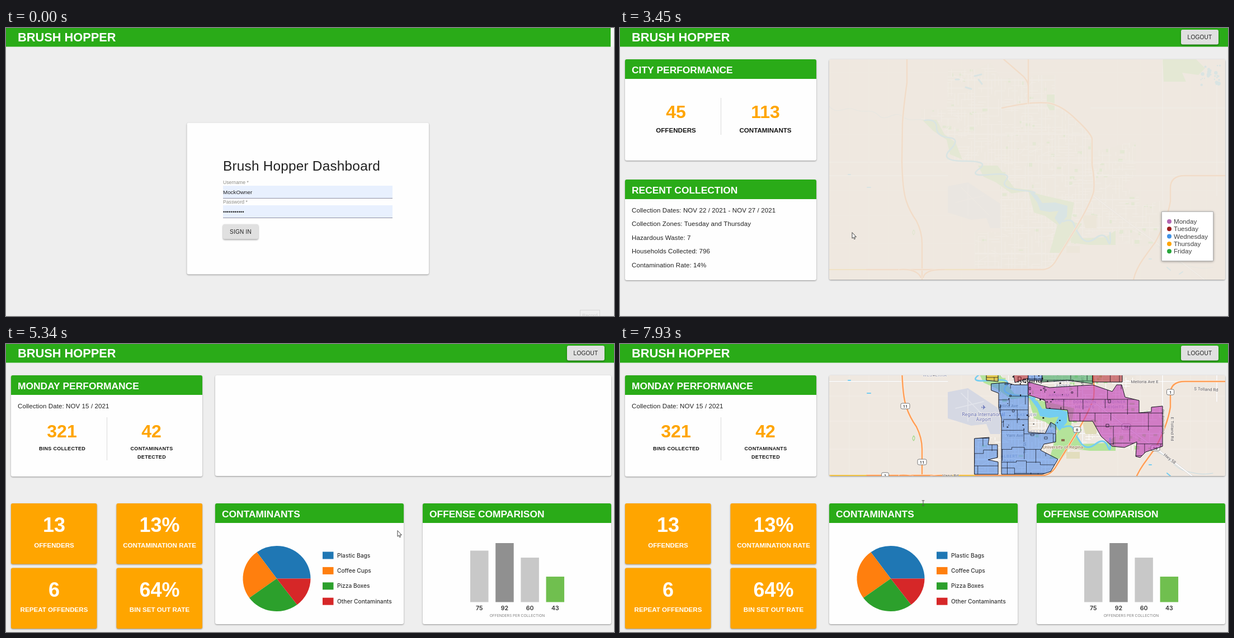
An HTML page with a canvas that plays this animation: 1087 by 515 pixels, repeating every 8 s.

```html
<!DOCTYPE html>
<html lang="en">
<head>
<meta charset="utf-8">
<title>Waste dashboard</title>
<style>
html, body { margin: 0; width: 100%; height: 100%; overflow: hidden; background: #eee; }
canvas { display: block; }
</style>
</head>
<body>
<canvas id="stage" width="1087" height="515"></canvas>
<script>
const W = 1087, H = 515, LOOP = 8000;
const GREEN = '#2aab18', ORANGE = '#ffa500', LAND = '#efe8e0';
const SANS = '"Liberation Sans", Arial, sans-serif';
const MAPFONT = 'Roboto, sans-serif';
const CHART = 'Inter, sans-serif';
const BRAND = 'Brush Hopper';
const stage = document.getElementById('stage').getContext('2d');
let g = stage;

// ---------- helpers ----------
let seed = 7;
const rnd = (a = 0, b = 1) => {
  seed = (seed * 16807) % 2147483647;
  return a + (b - a) * seed / 2147483647;
};
const ramp = (t, a, b) => Math.min(1, Math.max(0, (t - a) / (b - a)));

function text(s, x, y, size, { color = '#212121', weight = 400, font = SANS, align = 'left', gap = 0 } = {}) {
  g.font = `${weight} ${size}px ${font}`;
  g.letterSpacing = gap + 'px';
  g.textAlign = align;
  g.fillStyle = color;
  g.fillText(s, x, y);
}
const bold = (s, x, y, size, color, align = 'center', gap = 0) =>
  text(s, x, y, size, { color, weight: 700, align, gap });

function rect(x, y, w, h, color) {
  g.fillStyle = color;
  g.fillRect(x, y, w, h);
}
function box(x, y, w, h, r, color, blur = 2.5, dy = 1) {
  g.save();
  g.shadowColor = 'rgba(0,0,0,.4)';
  g.shadowBlur = blur;
  g.shadowOffsetY = dy;
  g.beginPath();
  g.roundRect(x, y, w, h, r);
  g.fillStyle = color;
  g.fill();
  g.restore();
}
function disc(x, y, r, color) {
  g.beginPath();
  g.arc(x, y, r, 0, 7);
  g.fillStyle = color;
  g.fill();
}
function line(d, color, width) {
  g.strokeStyle = color;
  g.lineWidth = width;
  g.lineJoin = g.lineCap = 'round';
  g.stroke(new Path2D(d));
}
function area(d, color) {
  g.fillStyle = color;
  g.fill(new Path2D(d));
}
function within(d, draw) {
  g.save();
  g.clip(new Path2D(d));
  draw();
  g.restore();
}
function layer(draw) {
  const c = document.createElement('canvas');
  c.width = W;
  c.height = H;
  g = c.getContext('2d');
  draw();
  g = stage;
  return c;
}

// ---------- map: ground, water, roads ----------
const PARK = '#b4e39a', WATER = '#74cdf1', ROAD = '#ff9f58';
const URBAN = 'M586 74H634L662 62L682 90H728L740 84H778V134L815 166L842 195V222L922 202V262L900 284' +
  'L928 298V320L970 308V390H922L850 362L790 402L768 430H634V364H680V262L630 242L584 238V184L538 166V145H584Z';

function townStreets() {
  within(URBAN, () => {
    area(URBAN, '#ede6dd');
    for (let i = 0; i < 150; i++) rect(rnd(540, 970), rnd(62, 430), rnd(2, 9), rnd(2, 7), PARK);
    for (let i = 0; i < 1500; i++) {
      const x = 538 + Math.round(rnd(0, 72)) * 6, y = 62 + Math.round(rnd(0, 74)) * 5;
      const n = rnd(6, 30), wide = rnd() < .5;
      rect(x, y, wide ? n : 1, wide ? 1 : n, '#fff');
    }
    for (let i = 0; i < 60; i++) {
      const x = rnd(540, 960), y = rnd(70, 420);
      line(`M${x} ${y}q${rnd(0, 12)} ${rnd(-8, 8)} ${rnd(8, 20)} ${rnd(-12, 12)}`, '#fff', 1);
    }
    for (const x of [634, 658, 682, 706, 730, 754, 778, 802, 827])
      line(`M${x} 56V450`, '#d9d6d6', 2.2), line(`M${x} 56V450`, '#fff', 1.4);
    for (const y of [93, 143, 190, 240, 264, 307, 357, 404])
      line(`M538 ${y}H970`, '#d9d6d6', 2.2), line(`M538 ${y}H970`, '#fff', 1.4);
  });
}

const ground = layer(() => {
  rect(374, 56, 708, 395, LAND);
  for (const x of [410, 445, 480, 560, 610, 890, 930, 1020, 1048]) line(`M${x} 56V450`, '#f3eee8', .8);
  for (const y of [80, 190, 290, 335, 385]) line(`M374 ${y}H1082`, '#f3eee8', .8);
  line('M374 240H682M374 264H586M842 143H1082M845 264H1000M970 56V330M850 240H1082M1067 100V300', '#e0dcd8', 2.4);
  line('M374 240H682M374 264H586M842 143H1082M845 264H1000M970 56V330M850 240H1082M1067 100V300', '#fff', 1.6);
  area('M586 283L622 276L681 315V358H662L655 340L628 343L586 330Z', '#d5d8e3');
  line('M610 285L660 335M600 312L650 300M622 280V335', '#e3e5ec', 1.5);
  townStreets();
  area('M970 56H1030L1046 72L1034 84L1005 80L1012 96H972Z', PARK);
  area('M763 119H777V147H768L763 138Z', PARK);
  area('M540 164H566L580 190L600 205L612 235L590 226L584 200L560 184Z', PARK);
  area('M640 246H675L705 286L740 290L700 296L672 276L650 266Z', PARK);
  area('M730 292L760 300L812 312L806 346L826 350L790 402H768L782 352L760 336L740 330Z', PARK);
  area('M808 352L824 376L868 374L886 362V388H840L806 384Z', PARK);
  area('M826 335H852V358H832Z', '#dfdcb8');
  area('M798 390H822V402H798Z', '#e2ddbd');
  line('M374 140C390 158 402 138 420 146S448 142 462 156S490 146 505 158S530 160 545 165', '#c3dbe4', 1.2);
  line('M960 390C980 396 992 420 1010 424S1040 432 1060 428', '#c3dbe4', 1);
  line('M545 165Q566 162 566 178T588 196T590 218T616 238T642 252T662 262T690 272T716 290T736 296', WATER, 2.6);
  area('M732 293L746 299L755 313L778 312L800 318L799 337L786 352L777 340L784 327L768 329L751 326L746 312Z', WATER);
  line('M792 346Q808 340 811 350T824 374T850 376T872 380T876 366', WATER, 3);
  line('M600 92h6M618 106l10 3M634 86l12 -3M641 92l6 8', WATER, 3);
  line('M442 285h6M408 262h4M978 428l6 5M1000 440l6 -4M946 413h4', WATER, 2);
  for (let i = 0; i < 26; i++) disc(rnd(1030, 1076), rnd(66, 106), rnd(1, 3.6), WATER);
  line('M525 361q4 4 0 9q-4 -4 0 -9', '#a5da8c', 1.2);

  line('M846 300L905 345L960 385L1045 450', '#d4d2d4', 3);
  line('M846 300L905 345L960 385L1045 450', '#fff', 2);
  const highways = [
    'M513 56V98Q507 140 505 170L504 238Q505 290 512 310Q518 328 530 345Q540 365 540 385V450',
    'M440 432H757Q772 430 780 415L815 358Q842 312 847 292Q849 270 844 245V198Q842 188 815 163Q790 138 765 134Q735 131 683 143',
    'M730 56V135M686 56L716 82Q729 92 730 104',
    'M1082 264H1010Q984 264 984 286V310Q978 345 957 383L936 412Q922 432 918 450',
    'M500 432Q530 430 538 446M580 432Q546 431 542 446'
  ];
  for (const d of highways) line(d, '#fff1e4', 3.8), line(d, ROAD, 2.5);
  line('M374 432H440M582 432H634', '#f5c542', 2.2);
});

// ---------- map: labels ----------
function label(s, x, y, deg = 0, size = 7.6, color = '#5c5a60', gap = .1, weight = 400) {
  g.save();
  g.translate(x, y);
  g.rotate(deg * Math.PI / 180);
  g.strokeStyle = 'rgba(244,240,234,.85)';
  g.lineWidth = 2;
  g.lineJoin = 'round';
  g.font = `${weight} ${size}px ${MAPFONT}`;
  g.letterSpacing = gap + 'px';
  g.textAlign = 'center';
  g.strokeText(s, 0, size * .35);
  text(s, 0, size * .35, size, { color, weight, font: MAPFONT, align: 'center', gap });
  g.restore();
}
function shield(s, ...spots) {
  const w = 10 + s.length * 3;
  for (const [x, y] of spots) {
    g.beginPath();
    g.roundRect(x - w / 2, y - 5, w, 10, 2.5);
    g.fillStyle = '#fff';
    g.fill();
    g.strokeStyle = '#777';
    g.lineWidth = 1;
    g.stroke();
    text(s, x, y + 2.7, 7.4, { color: '#444', weight: 700, font: MAPFONT, align: 'center' });
  }
}

const streets = layer(() => {
  [
    ['Olm Ave N', 513, 142, 8], ['Olm Ave N', 627, 144], ['Mabrook St', 657, 133, 90],
    ['Vang Rd', 770, 142, 32], ['Vang Rd', 843, 226, 82], ['Vang Rd', 591, 432],
    ['Corvin St', 730, 182, 90], ['Elb Ave N', 754, 188], ['Orr Ave', 754, 235],
    ['Marl St', 826, 260, -90], ['Selina Ave', 694, 307], ['Yarn Ave', 706, 360],
    ['Tor St', 723, 383, -90], ['Linder Rd', 970, 115, 90], ['Fennwick St', 916, 144],
    ['Melloria Ave E', 938, 264], ['S Tolland Rd', 1048, 278, 3], ['Sorrel Fen Rd', 1067, 200, -90],
    ['E Tolland Rd', 988, 349, 90], ['Hwy 58', 983, 402, 38], ['Corbinola Rd', 970, 336, -90]
  ].forEach(a => label(...a));
  shield('11', [513, 101], [505, 210], [510, 308], [540, 408]);
  shield('11A', [716, 82]);
  shield('6', [744, 136], [817, 350], [730, 445], [730, 55]);
  shield('46', [820, 163], [998, 143]);
  shield('1', [984, 283], [474, 432]);
  shield('58', [905, 345], [957, 383], [1042, 449]);
});

const places = layer(() => {
  [
    ['LAKEWOOD', 627, 99], ['ENGLEWOOD', 683, 104], ['SHERWOOD|ESTATES', 599, 122], ['ARGYLE|PARK', 699, 125],
    ['CHURCHILL|DOWNS', 767, 163], ['FAIRWAYS|WEST', 570, 168], ['COVENTRY|PLACE', 664, 218],
    ['DIEPPE|PLACE', 593, 227], ['WESTERRA', 563, 252], ['EASTVIEW', 787, 219], ['GLENCAIRN|VILLAGE', 880, 227],
    ['BRODERS|ANNEX', 793, 262], ['ARNHEIM|PLACE', 785, 288], ['DOMINION|HEIGHTS', 831, 300],
    ['GARDINER|HEIGHTS', 884, 300], ['LAKEVIEW', 725, 323], ['HILLSDALE', 753, 353], ['ALBERT|PARK', 696, 397]
  ].forEach(([s, x, y]) => s.split('|').forEach((row, i) => label(row, x, y + i * 9, 0, 7.5, '#8c95b8', .6)));
  label('Regina', 732, 261, 0, 14.5, '#3a3a3e', 0, 500);
  label('Regina International', 650, 323, 0, 8.2, '#5a68b4', .2);
  label('Airport', 650, 332, 0, 8.2, '#5a68b4', .2);
  label('University of Regina', 792, 381, 0, 8, '#8b6a4c', .1);
  text('✈', 650, 314, 11, { color: '#5a68b4', font: '"DejaVu Sans", sans-serif', align: 'center' });
  rect(789, 367, 6, 4, '#8b6a4c');
});

// Street names shown only while the short map is loading
const early = layer(() => {
  [
    ['Tansey Rd', 537, 269, 90], ['Melloria Ave', 735, 266], ['Ferl Ave', 755, 344], ['Hobbin St', 681, 318, 90],
    ['Quill St', 690, 392, 90]
  ].forEach(a => label(...a));
  shield('58', [852, 305]);
});

// ---------- map: collection zones ----------
function zone(color, shapes, cell) {
  for (const d of shapes) {
    area(d, color);
    within(d, () => {
      const [, x0, y0] = d.match(/M(\d+) (\d+)/).map(Number);
      for (let y = y0 - 130; y < y0 + 200; y += cell * rnd(.7, 1.2)) {
        let s = `M${x0 - 140} ${y}`;
        for (let x = x0 - 140; x < x0 + 260;) {
          x += rnd(.5, 1.3) * cell;
          s += `H${x}v${rnd() < .5 ? 0 : rnd(-7, 7)}`;
          if (rnd() < .6) s += `v${cell * rnd(.4, 1)}M${x} ${y}`;
        }
        line(s, 'rgba(10,10,20,.75)', .9);
      }
      for (let i = 0; i < 14; i++) {
        g.lineWidth = .9;
        g.strokeRect(x0 + rnd(-70, 150), y0 + rnd(-40, 130), rnd(2, 6), rnd(2, 6));
      }
    });
    line(d, '#14141c', 1);
  }
}

const zones = layer(() => {
  zone('rgba(255,192,42,.66)', [
    'M586 73H634V143H682V239L676 240V264L655 262V243L630 240L584 238V183H570V178L540 166L538 145H583V73Z',
    'M609 64L666 62V72H609Z'
  ], 27);
  zone('rgba(85,178,114,.68)', [
    'M634 72H681V93H728V137L682 143H634Z',
    'M682 143L728 137V188L682 172Z',
    'M733 90L741 84L744 95H778V137H732V92Z',
    'M733 156L742 143H778V192L733 190Z',
    'M778 206H802V234H778Z',
    'M754 247L776 245L827 240V224H845V268L800 262L754 265Z'
  ], 26);
  zone('rgba(184,56,64,.62)', [
    'M682 172L718 180L730 190V258L706 266L702 240L682 238Z',
    'M845 220L922 200V236L898 242V265H845Z'
  ], 30);
  zone('rgba(92,148,234,.64)', [
    'M730 247L755 250V262H730Z',
    'M664 268L690 266L705 270H730V355L760 357L770 337L779 342V372L758 376L752 387L783 403L770 425L755 430H682V330L677 310V285L664 280Z',
    'M634 366L660 364L658 377H675V400L658 404L676 408V430H634Z'
  ], 24);
  zone('rgba(192,64,184,.64)', [
    'M730 265L768 275L845 270L880 282L888 270H897L903 292L928 298V320L950 318V310L970 308V380L940 390L930 400L922 398L924 372L902 382L880 380L860 362L845 335H803L800 315L762 312L760 298L730 288Z',
    'M778 240L827 226V240Z',
    'M558 247L566 241L571 252L560 253Z'
  ], 32);
  for (let i = 0; i < 60; i++) rect(rnd(690, 795), rnd(170, 345), rnd(1, 3), rnd(1, 3), '#14141c');
  for (let i = 0; i < 6; i++) line(`M652 ${230 + i * 2}H676`, '#1f5a33', 1.2);
});

function drawMap(height, dy, { base = 0, names = 0, extra = 0, town = names, areas = 0, hover = false }) {
  g.save();
  g.beginPath();
  g.roundRect(374, 56, 708, height, 3);
  g.clip();
  rect(374, 56, 708, height, LAND);
  g.translate(0, dy);
  for (const [img, a] of [[ground, base], [streets, names], [places, town], [early, extra], [zones, areas]]) {
    g.globalAlpha = a;
    if (a) g.drawImage(img, 0, 0);
  }
  g.globalAlpha = 1;
  if (hover) {
    const d = 'M699 331H706V323L713 318H731V339H723L718 347L704 344Z';
    area(d, '#3a82f2');
    line(d, '#14141c', 1);
  }
  g.restore();
}

// ---------- pages ----------
function header(width) {
  rect(0, 0, W, H, '#eee');
  rect(0, 0, W, 33.5, '#f7f7f7');
  rect(0, 0, width, 33.5, GREEN);
  bold(BRAND.toUpperCase(), 21, 24, 21.8, '#fff', 'left');
}
function button(s, x, y, w, color = '#e0e0e0') {
  box(x, y, w, 26.5, 3, color, 3, 1.3);
  text(s, x + w / 2, y + 16.7, 10.1, { align: 'center', gap: .2 });
}
function card(x, y, w, h, title) {
  box(x, y, w, h, 3, '#fefefe');
  if (!title) return;
  g.beginPath();
  g.roundRect(x, y, w, 35, [3, 3, 0, 0]);
  g.fillStyle = GREEN;
  g.fill();
  bold(title, x + 12, y + 25, 17.4, '#fff', 'left');
}

function field(name, y) {
  text(name, 388, y - 3, 8.6, { color: '#8c8c86', gap: .05 });
  rect(388, y, 303, 23, '#e8f0fe');
  rect(388, y + 22, 303, 1, '#8f90a4');
}
function login(t) {
  header(1081);
  box(323.5, 169.5, 432.5, 271, 3, '#fefefe');
  text(BRAND + ' Dashboard', 388, 255, 24.4, { gap: .2 });
  field('Username *', 282);
  text('MockOwner', 388, 297.3, 9.8);
  field('Password *', 317);
  text('•'.repeat(11), 388, 331.5, 9.8);
  const press = ramp(t, 2020, 2550);
  button('SIGN IN', 388, 351, 63, press ? '#d8d8d8' : '#e0e0e0');
  if (press > 0 && press < 1) {
    within('M388 351h63v26.5h-63z', () => disc(415, 366, 6 + 44 * press, `rgba(0,0,0,${.16 * (1 - press)})`));
  }
  g.globalAlpha = 1 - ramp(t, 60, 200);
  g.strokeStyle = '#d6d6d6';
  g.lineWidth = 1;
  g.strokeRect(1026.5, 504.5, 35, 16);
  text('Record', 1030, 517, 8.6, { color: '#d2d2d2' });
  g.globalAlpha = 1;
}

function cityPage(t) {
  header(W);
  button('LOGOUT', 1003, 3, 67);
  card(9, 56, 342, 181, 'CITY PERFORMANCE');
  bold('45', 100, 160.5, 32, ORANGE);
  bold('113', 260, 160.5, 32, ORANGE);
  bold('OFFENDERS', 100, 186.5, 11.6, '#151515');
  bold('CONTAMINANTS', 260, 186.5, 11.6, '#151515');
  rect(180, 125, 1, 66, '#dcdcdc');
  card(9, 271, 342, 180, 'RECENT COLLECTION');
  ['Collection Dates: NOV 22 / 2021 - NOV 27 / 2021', 'Collection Zones: Tuesday and Thursday',
    'Hazardous Waste: 7', 'Households Collected: 796', 'Contamination Rate: 14%']
    .forEach((s, i) => text(s, 21, 330 + i * 24.45, 11.5, { gap: .1 }));

  card(374, 56, 708, 394);
  if (t >= 3040) {
    drawMap(394, 0, {
      base: ramp(t, 3400, 3700), names: ramp(t, 3600, 3850), areas: ramp(t, 3910, 4060), hover: t >= 5060
    });
  }
  box(968, 328, 93, 88.5, 2, '#fff', 4, 1);
  g.strokeStyle = '#b5b5b5';
  g.lineWidth = 1;
  g.strokeRect(968.5, 328.5, 92, 88);
  [['Monday', '#b368b3'], ['Tuesday', '#9c1c1c'], ['Wednesday', '#3f92e6'], ['Thursday', ORANGE], ['Friday', '#27a63a']]
    .forEach(([s, color], i) => {
      const y = 346 + i * 13.3;
      disc(982, y, 4, color);
      text(s, 990, y + 4, 11.6, { color: '#404040' });
    });
}

function tile(x, y, value, name) {
  box(x, y, 153.5, 108.5, 3, ORANGE);
  bold(value, x + 77, y + 51, 36, '#fff');
  bold(name, x + 77, y + 78.5, 11.6, '#fff');
}
function pie() {
  const slices = [['Plastic Bags', '#1f77b4', 126], ['Coffee Cups', '#ff7f0e', 90],
    ['Pizza Boxes', '#2ca02c', 91], ['Other Contaminants', '#d62728', 53]];
  let from = 0;
  slices.forEach(([s, color, deg], i) => {
    const to = from - deg * Math.PI / 180;
    g.beginPath();
    g.moveTo(484, 419.5);
    g.ellipse(484, 419.5, 60.5, 58.5, 0, from, to, true);
    g.fillStyle = color;
    g.fill();
    from = to;
    const y = 378 + i * 27.4;
    rect(566, y - 6.5, 19.5, 13, color);
    text(s, 592, y + 3.5, 10.2, { color: '#333', font: CHART, weight: 500 });
  });
}
function bars() {
  [[75, 92, '#c8c8c8'], [92, 105.5, '#909090'], [60, 79.5, '#c8c8c8'], [43, 45.5, '#70bf4f']].forEach(([n, h, color], i) => {
    const x = 830 + i * 45.2;
    rect(x, 461.5 - h, 32.5, h, color);
    text(n, x + 16.3, 475.5, 10.6, { color: '#333', font: CHART, weight: 600, align: 'center' });
  });
  text('OFFENDERS PER COLLECTION', 914, 488, 6.7, { color: '#808080', font: CHART, align: 'center' });
}
function mondayPage(t) {
  header(W);
  button('LOGOUT', 1003, 3, 67);
  card(9, 56, 342, 181, 'MONDAY PERFORMANCE');
  text('Collection Date: NOV 15 / 2021', 21, 115, 11.5, { gap: .1 });
  bold('321', 100, 166.5, 32, ORANGE);
  bold('42', 260, 166.5, 32, ORANGE);
  bold('BINS COLLECTED', 100.5, 190, 9, '#151515', 'center', .3);
  bold('CONTAMINANTS', 260.5, 190, 9, '#151515', 'center', .3);
  bold('DETECTED', 260.5, 204.5, 9, '#151515', 'center', .3);
  rect(180, 131, 1, 77, '#dcdcdc');
  card(374, 56, 708, 180);
  if (t >= 5470) {
    drawMap(180, -197, {
      base: ramp(t, 5800, 5980), names: ramp(t, 5860, 6100), town: ramp(t, 6060, 6260),
      extra: .7 * ramp(t, 5860, 5980) * (1 - ramp(t, 6060, 6200)), areas: ramp(t, 6260, 6460)
    });
  }
  tile(9, 285, '13', 'OFFENDERS');
  tile(197.5, 285, '13%', 'CONTAMINATION RATE');
  tile(9, 400.5, '6', 'REPEAT OFFENDERS');
  tile(197.5, 400.5, '64%', 'BIN SET OUT RATE');
  card(374, 285, 337, 216, 'CONTAMINANTS');
  pie();
  card(745, 285, 337, 216, 'OFFENSE COMPARISON');
  bars();
}

// ---------- pointer ----------
// start, end, steps, then from / bend / to points
const moves = [
  [70, 680, 8, [1056, 510], [860, 300], [691, 422]],
  [1010, 1690, 11, [691, 422], [560, 400], [415, 366]],
  [4380, 5130, 11, [415.5, 365], [820, 288], [700, 334]],
  [7320, 7670, 6, [700, 334], [580, 342], [450, 345]],
  [7860, 7930, 2, [450, 345], [496, 314], [542, 285]]
];
function pointerAt(t) {
  let [, , , , , at] = moves[0];
  for (const [start, end, steps, a, b, c] of moves) {
    if (t < start) break;
    const n = Math.min(steps, 1 + Math.floor((t - start) / (end - start) * (steps - 1) + 1e-6));
    const k = n / steps, q = 1 - k;
    at = a.map((v, i) => q * q * v + 2 * q * k * b[i] + k * k * c[i]);
  }
  return at;
}
function pointer(t) {
  if (t < 70) return;
  const [x, y] = pointerAt(t);
  const onButton = t < 2880 && x < 451 && y > 351 && y < 378;
  g.save();
  g.translate(x, y);
  if (t >= 7930) {
    line('M-2 -5H2M0 -5V4M-2 4H2', '#555', 1);
  } else {
    const d = onButton
      ? 'M0 1.2Q1 -.6 2 1.2V5.6L7 6.8Q7.6 7.4 7.2 10L6.2 13.6H1.2L-2.6 8.8Q-2.4 7.4 -1 8L0 9Z'
      : 'M0 0V10.2L2.3 8.2L3.9 11.8L5.5 11L4 7.6H7Z';
    area(d, '#fff');
    line(d, '#333', .9);
  }
  g.restore();
}

function frame(now) {
  const t = now % LOOP;
  if (t < 2880) login(t);
  else if (t < 5340) cityPage(t);
  else mondayPage(t);
  pointer(t);
  requestAnimationFrame(frame);
}
let began;
requestAnimationFrame(function first(now) {
  began = now;
  const tick = time => {
    const t = (time - began) % LOOP;
    if (t < 2880) login(t);
    else if (t < 5340) cityPage(t);
    else mondayPage(t);
    pointer(t);
    requestAnimationFrame(tick);
  };
  tick(now);
});
</script>
</body>
</html>
```
